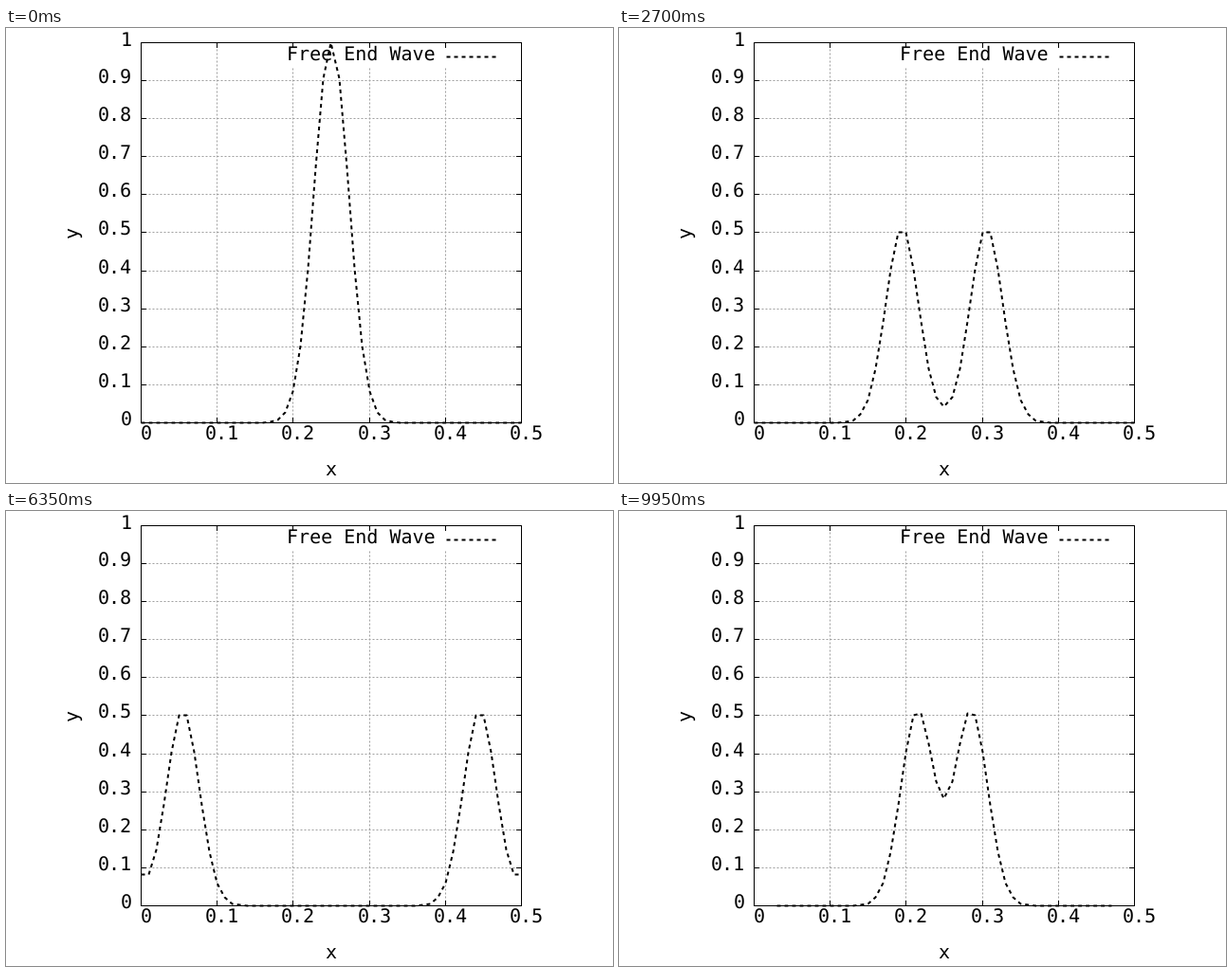
A matplotlib script that plays this animation: 640 px wide and 480 px high, repeating every 10 s.

```python
import math

import matplotlib.pyplot as plt
import numpy as np
from matplotlib.animation import FuncAnimation

W, H, DPI = 640, 480, 100
PX = 72 / DPI                      # points per pixel
LEFT, RIGHT, TOP, BOTTOM = 142, 543, 15, 416
FRAMES, INTERVAL = 200, 50
CELLS, CYCLE = 50, 49              # grid cells, steps between refocusings
TIC = 5
KEY_LEFT, KEY_BOTTOM = 290, 40

plt.rcParams["path.simplify"] = False
plt.rcParams["text.hinting"] = "none"
plt.rcParams["font.family"] = "DejaVu Sans Mono"

fig = plt.figure(figsize=(W / DPI, H / DPI), dpi=DPI, facecolor="white")
ax = fig.add_axes([0, 0, 1, 1])
ax.set_xlim(0, W)
ax.set_ylim(H, 0)
ax.axis("off")


def nearest(v):
    return np.ceil(np.asarray(v) - 0.5)


def to_px(x, y):
    """Data coordinates to whole pixels."""
    return (nearest(LEFT + x / 0.5 * (RIGHT - LEFT)),
            nearest(BOTTOM - y * (BOTTOM - TOP)))


def stroke(xs, ys, width=1, color="black", dash=None, z=2):
    """Line through pixel centres; dash is (on, off) in pixels."""
    style = (0, tuple(d / width for d in dash)) if dash else "-"
    artist, = ax.plot(np.add(xs, 0.5), np.add(ys, 0.5), color=color,
                      lw=width * PX, ls=style, snap=False, zorder=z,
                      solid_capstyle="projecting", dash_capstyle="butt")
    return artist


def grid_line(xs, ys):
    stroke(xs, ys, color="#a0a0a0", dash=(2, 2), z=1)


def wave_line(xs, ys):
    return stroke(xs, ys, width=2, dash=(4, 4), z=5)


def label(x, y, text, **kw):
    ax.text(x, y, text, fontsize=20 * PX, color="black", ha="left",
            va="baseline", zorder=4, **kw)


def draw_frame():
    for i in range(6):
        x = float(nearest(LEFT + i * (RIGHT - LEFT) / 5))
        if 0 < i < 5:
            grid_line([x, x], [BOTTOM, KEY_BOTTOM if x > KEY_LEFT else TOP])
            stroke([x, x], [BOTTOM, BOTTOM - TIC])
            stroke([x, x], [TOP, TOP + TIC])
        text = f"{i / 10:g}"
        label(x + 6 - 6 * len(text), 435, text)
    for i in range(11):
        y = float(nearest(BOTTOM - i * (BOTTOM - TOP) / 10))
        if 0 < i < 10:
            grid_line([LEFT, RIGHT], [y, y])
            stroke([LEFT, LEFT + TIC], [y, y])
            stroke([RIGHT, RIGHT - TIC], [y, y])
        text = f"{i / 10:g}"
        label(133 - 12 * len(text), y + 4, text)
    stroke([LEFT, RIGHT, RIGHT, LEFT, LEFT],
           [BOTTOM, BOTTOM, TOP, TOP, BOTTOM])
    label(336, 472, "x")
    label(77, 221, "y", rotation=90, rotation_mode="anchor")
    label(296, 34, "Free End Wave")
    wave_line([464, 517], [30, 30])


def simulate():
    """Wave equation at Courant number 1 with free ends, starting at rest."""
    prev = np.exp(-1000 * (xs - 0.25) ** 2)
    cur = prev.copy()
    states = []
    for _ in range(FRAMES):
        states.append(cur)
        new = np.empty_like(cur)
        new[1:-1] = cur[2:] + cur[:-2] - prev[1:-1]
        new[0], new[-1] = new[1], new[-2]
        prev, cur = cur, new
    return states


def visible(k):
    """Points drawn; after the last refocusing the ends fall below range."""
    return slice(3, -3) if k + 1 >= 4 * CYCLE else slice(None)


xs = np.linspace(0, 0.5, CELLS + 1)
waves = simulate()
draw_frame()
curve = wave_line([], [])


def update(k):
    part = visible(k)
    px, py = to_px(xs[part], np.clip(waves[k][part], 0, 1))
    curve.set_data(px + 0.5, py + 0.5)
    return curve,


anim = FuncAnimation(fig, update, frames=FRAMES, interval=INTERVAL,
                     repeat=True, repeat_delay=0)
plt.show()
```
